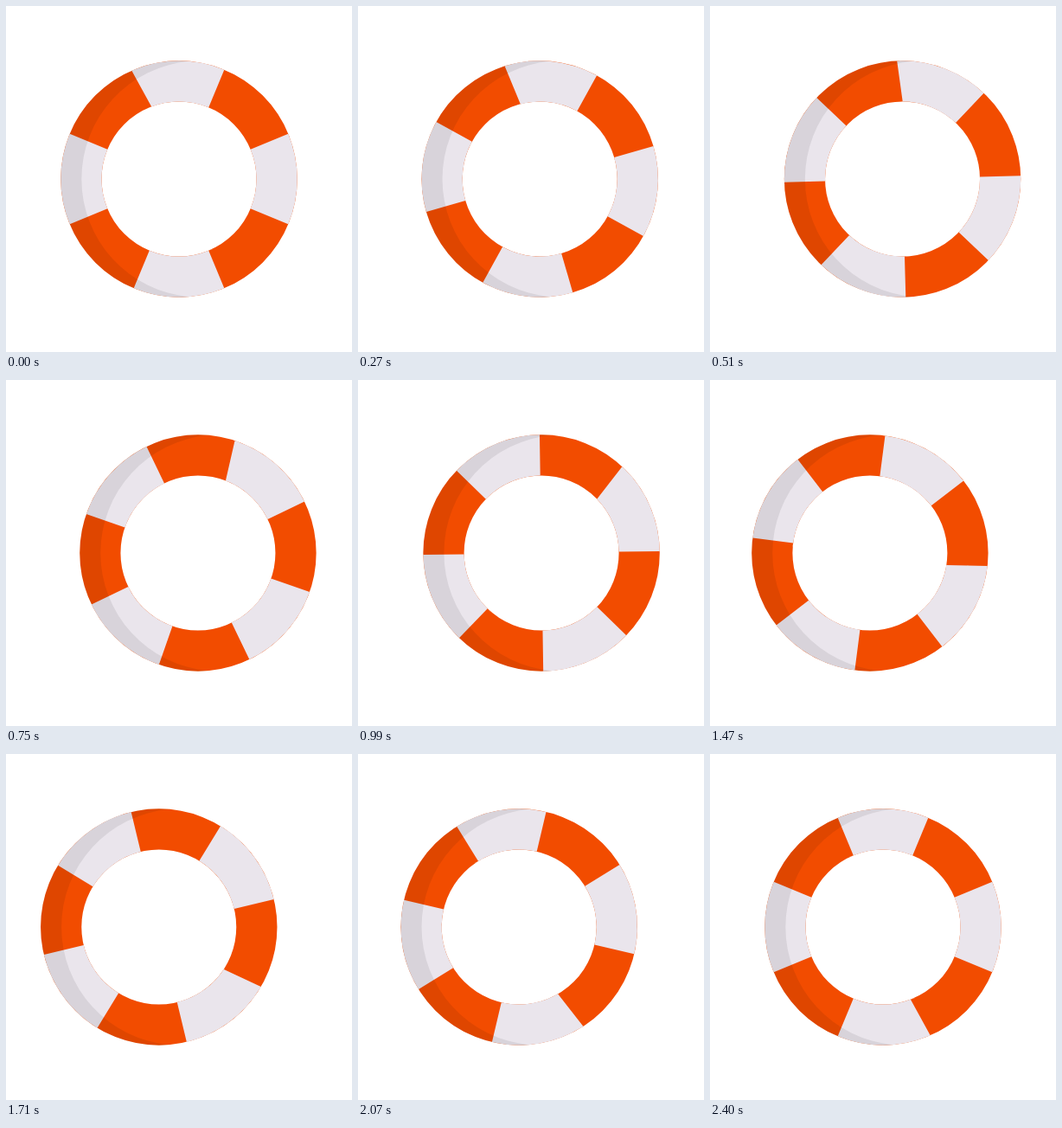
These frames come from a looping animation (400 px wide and 400 px high, 2460 ms). An HTML page:

```html
<!DOCTYPE html>
<html lang="en">
<head>
<meta charset="utf-8">
<title>Rolling lifebuoy</title>
<style>
  html, body { margin: 0; width: 100%; height: 100%; overflow: hidden; background: #fff; }
  svg { display: block; width: 100%; height: 100%; }
  circle { fill: none; stroke-width: 47.2; }
</style>
</head>
<body>
<svg viewBox="0 0 400 400">
  <g id="buoy" transform="translate(200 200)">
    <circle r="113.1" stroke="#f24c00"/>
    <circle id="bands" r="113.1" stroke="#eae5ec" pathLength="8" stroke-dasharray="1"/>
    <path fill="#000" fill-opacity=".08"
      d="M12-136.17A136.7 136.7 0 1 0 12 136.17A136.7 136.7 0 0 1 12-136.17Z"/>
  </g>
</svg>
<script>
  const LOOP = 2460, MOVE = 2400, STEP = 30, SWING = 24;
  const buoy = document.getElementById('buoy');
  const bands = document.getElementById('bands');

  const smooth = u => u * u * (3 - 2 * u);
  const mix = (a, b, u) => a + (b - a) * smooth(u);

  // Right, across to the left, then back to the centre.
  function offset(p) {
    if (p < 0.25) return mix(0, SWING, p * 4);
    if (p < 0.75) return mix(SWING, -SWING, (p - 0.25) * 2);
    return mix(-SWING, 0, (p - 0.75) * 4);
  }

  function draw(now) {
    const time = Math.floor((now % LOOP) / STEP) * STEP;
    const p = Math.min(time / MOVE, 1);
    buoy.setAttribute('transform', `translate(${200 + offset(p)} 200)`);
    bands.setAttribute('transform', `rotate(${mix(0, 180, p) - 22.5})`);
  }

  const start = performance.now();
  function tick() {
    draw(performance.now() - start);
    requestAnimationFrame(tick);
  }
  tick();
</script>
</body>
</html>
```
